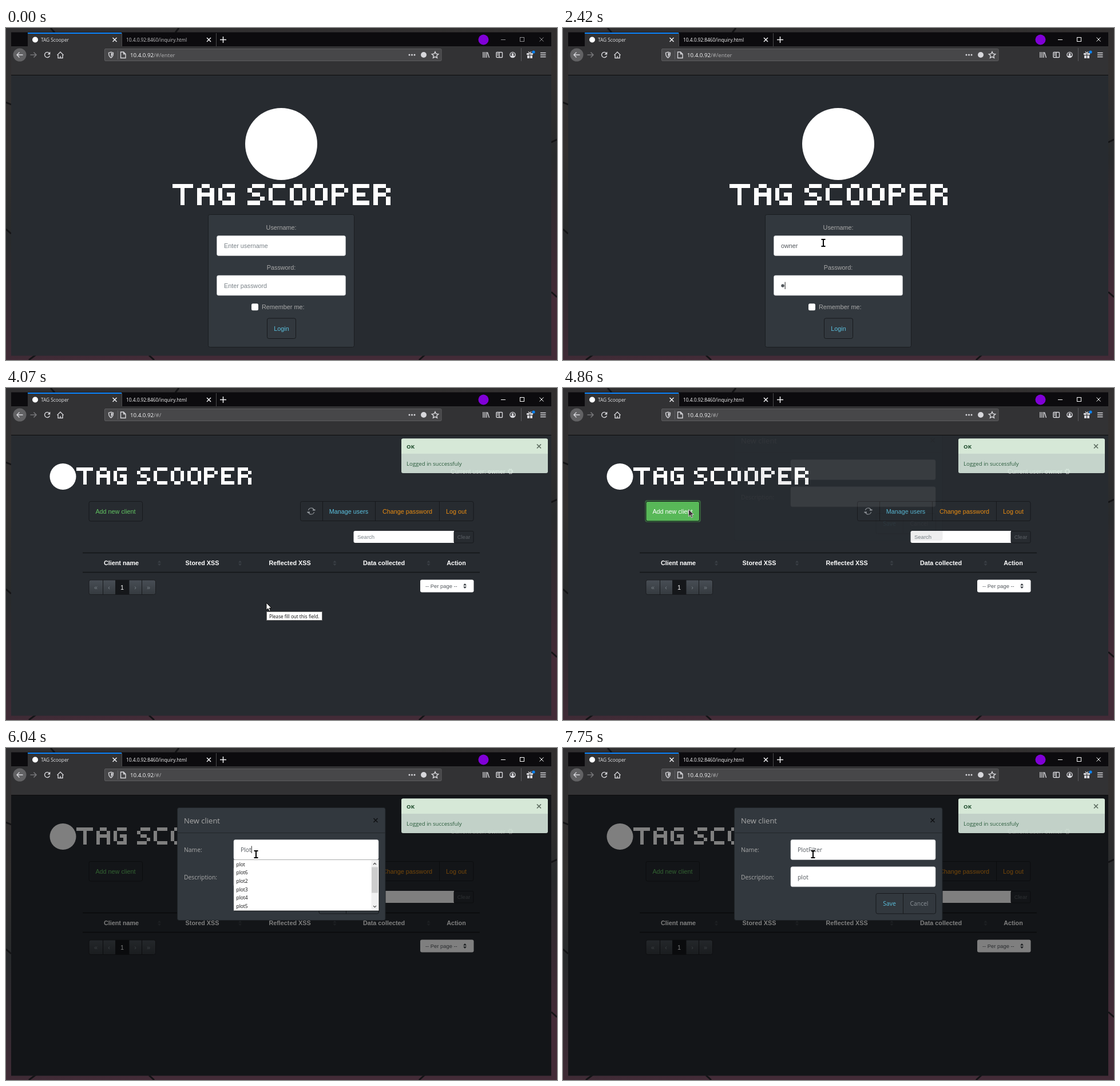
These frames come from a looping animation (963 px wide and 581 px high, 8000 ms). An HTML page:

```html
<!DOCTYPE html>
<html lang="en">
<head>
<meta charset="utf-8">
<title>TAG Scooper</title>
<style>
  html, body { margin: 0; width: 100%; height: 100%; overflow: hidden; background: #272b30; }
  svg { display: block; width: 100%; height: 100%; }
  text { white-space: pre; }
  .a { font: 10.8px "Liberation Sans", Arial, sans-serif; }
  .u { font: 10.35px "Open Sans", "Noto Sans", sans-serif; }
  .tab { font-size: 8.3px; }
  .url { font-size: 9.7px; }
  .sm { font-size: 9.5px; }
  .b { font-weight: bold; }
  .mid { text-anchor: middle; }
  .label { fill: #aaa; }
  .hint { fill: #7a8288; }
  .typed { fill: #52575c; }
  .info { fill: #5bc0de; }
  .warn { fill: #e88c12; }
  .white { fill: #fff; }
  .field { fill: #fff; stroke: #c9cdd1; stroke-width: .6; }
  .btn { fill: none; stroke: #17191c; }
  .line { fill: none; stroke: #d7d7db; stroke-width: 1.4; }
  .solid { fill: #d7d7db; }
  .list { font: 8.4px "Open Sans", "Noto Sans", sans-serif; fill: #0c0c0d; }
</style>
</head>
<body>
<svg id="stage" viewBox="0 0 963 581">
  <defs>
    <linearGradient id="wall" x2="0.25" y2="1">
      <stop offset="0" stop-color="#302f31"/>
      <stop offset=".35" stop-color="#33302f"/>
      <stop offset=".6" stop-color="#282a2c"/>
      <stop offset="1" stop-color="#432b37"/>
    </linearGradient>
    <linearGradient id="page" x2="0" y2="1">
      <stop offset="0" stop-color="#484e55"/>
      <stop offset="1" stop-color="#353a3f"/>
    </linearGradient>
    <path id="word" shape-rendering="crispEdges"/>
    <path id="sort" d="M-3 -1L0 -4.5 3 -1zM-3 1L0 4.5 3 1z"/>
    <path id="cross" d="M-3.5 -3.5l7 7m0 -7l-7 7"/>
  </defs>

  <rect width="963" height="581" fill="url(#wall)"/>
  <path d="M0 352l9 8M953 462l10 9M40 581l12-9M250 573l9 8M722 581l10-9M78 0l7 8M296 8l6-8M953 200l10-5M0 130l9 4" stroke="#141416" stroke-width="3"/>
  <rect x="9" y="82" width="944" height="491.5" fill="#272b30"/>

  <g id="login">
    <circle cx="481" cy="203" r="63" fill="#fff"/>
    <use href="#word" transform="translate(290.5 273) scale(7.33)" fill="#fff"/>
    <rect x="353.5" y="326.5" width="255" height="232" rx="3" fill="#32383e" stroke="#1a1d20"/>
    <text class="a label mid" x="481" y="353">Username:</text>
    <rect class="field" x="368.5" y="363.5" width="225" height="35" rx="3"/>
    <text class="a" id="userText" x="381" y="385"></text>
    <text class="a label mid" x="481" y="422.5">Password:</text>
    <rect class="field" x="368.5" y="433" width="225" height="35" rx="3"/>
    <text class="a hint" id="passHint" x="381" y="454.5">Enter password</text>
    <g id="dots" fill="#52575c"></g>
    <rect x="429" y="482.3" width="12" height="12" rx="2.5" fill="#fff"/>
    <text class="a label" x="447" y="492">Remember me:</text>
    <rect class="btn" x="456.5" y="508" width="50" height="35.5" rx="3"/>
    <text class="a info mid" x="481.5" y="530">Login</text>
  </g>

  <g id="main">
    <circle cx="99.5" cy="155" r="23" fill="#fff"/>
    <use href="#word" transform="translate(123 139.3) scale(5.88)" fill="#fff"/>
    <text class="a label" x="777" y="150" style="font-size:10.6px">Current user: <tspan class="b">owner</tspan></text>
    <circle cx="881.5" cy="146" r="3.6" fill="none" stroke="#aaa" stroke-width="2.4" stroke-dasharray="1.9 .93"/>
    <circle cx="881.5" cy="146" r="2.8" fill="none" stroke="#aaa"/>
    <rect id="addRing" x="143.2" y="196.2" width="97.6" height="38.6" rx="4" fill="#39653f"/>
    <rect class="btn" id="addBox" x="145" y="198.5" width="93.5" height="34.5" rx="3"/>
    <text class="a mid" id="addText" x="191.5" y="219.5">Add new client</text>
    <rect class="btn" x="514.5" y="198.5" width="302.5" height="34" rx="3"/>
    <path class="btn" d="M553.5 198.5v34M645.5 198.5v34M757.5 198.5v34"/>
    <g fill="none" stroke="#9a9fa4" stroke-width="1.1">
      <path d="M528.5 214a5.2 5.2 0 0 1 9.8-1M538.5 217a5.2 5.2 0 0 1-9.8 1"/>
      <path d="M536 213.5h4.5M531 217.5h-4.5" stroke-width="2"/>
    </g>
    <text class="a info mid" x="599" y="219.5">Manage users</text>
    <text class="a warn mid" x="701.5" y="219.5">Change password</text>
    <text class="a warn mid" x="787" y="219.5">Log out</text>
    <path d="M783 250h-172.500a3 3 0 0 0-3 3v15a3 3 0 0 0 3 3H783z" fill="#fff"/>
    <rect class="btn" x="783" y="250.5" width="34" height="20.5" rx="2"/>
    <text class="a sm hint" x="614" y="264">Search</text>
    <text class="a sm mid" x="800" y="264" fill="#5b6065">Clear</text>
    <path d="M134 288.500H828M134 322.500H828" stroke="#131517" stroke-width="1.3"/>
    <g class="a b mid white">
      <text x="201.500" y="310">Client name</text>
      <text x="343" y="310">Stored XSS</text>
      <text x="496" y="310">Reflected XSS</text>
      <text x="660.500" y="310">Data collected</text>
      <text x="787" y="310">Action</text>
    </g>
    <g fill="#3b4046">
      <use href="#sort" x="268" y="306.500"/><use href="#sort" x="409" y="306.500"/>
      <use href="#sort" x="574.500" y="306.500"/><use href="#sort" x="738.500" y="306.500"/>
    </g>
    <rect x="145" y="336" width="116.500" height="25.500" rx="3" fill="url(#page)" stroke="#1b1d20"/>
    <rect x="191" y="336" width="24.500" height="25.500" fill="#15171a"/>
    <path class="btn" d="M169.500 336v25.500M237.500 336v25.500"/>
    <g class="a mid hint">
      <text x="157" y="352.500">«</text><text x="180" y="352.500">‹</text>
      <text class="white" x="203" y="353">1</text>
      <text x="226" y="352.500">›</text><text x="249" y="352.500">»</text>
    </g>
    <rect x="724" y="335.500" width="93.500" height="22" rx="3" fill="#fff"/>
    <text class="a typed" x="733" y="350" style="font-size:9.4px">-- Per page --</text>
    <use href="#sort" x="802" y="346.500" fill="#33383d"/>
  </g>

  <rect id="backdrop" x="9" y="83" width="944" height="490.500"/>

  <g id="modal">
    <rect x="299.500" y="104.500" width="363.500" height="197" rx="3" fill="#32383e" stroke="#1f2327"/>
    <path d="M300 148.500H663" stroke="#23272b"/>
    <text class="u label" x="311" y="131.500" style="font-size:13px">New client</text>
    <use href="#cross" x="646" y="126.500" stroke="#101214" stroke-width="1.6"/>
    <text class="u label" x="311" y="182">Name:</text>
    <text class="u label" x="311" y="229.500">Description:</text>
    <rect class="field" x="398" y="160.500" width="253" height="35" rx="3"/>
    <rect class="field" x="398" y="207.800" width="253" height="35" rx="3"/>
    <text class="u typed" id="nameText" x="410" y="182"></text>
    <text class="u typed" id="descText" x="410" y="229.500"></text>
    <rect class="btn" x="547" y="254.500" width="104.500" height="35.500" rx="3"/>
    <path class="btn" d="M594.500 254.500v35.500"/>
    <text class="u info mid" x="570.500" y="276">Save</text>
    <text class="u mid" x="622.500" y="276" fill="#8a9197">Cancel</text>
  </g>

  <g id="toast">
    <rect x="691" y="88.500" width="256" height="60.500" rx="3" fill="#e1f3e7" fill-opacity=".85"/>
    <path d="M691 115V91.500a3 3 0 0 1 3-3H944a3 3 0 0 1 3 3V115z" fill="#dbeedb" fill-opacity=".8"/>
    <text class="u b" x="700" y="106" fill="#1c4a2a" style="font-size:9.600px">OK</text>
    <use href="#cross" x="931.500" y="102" stroke="#5c6b5f" stroke-width="1.700"/>
    <text class="u" x="700" y="136" fill="#2a5c3c" style="font-size:9.650px">Logged in successfuly</text>
  </g>

  <g id="chrome">
    <rect x="9" y="7.500" width="944" height="25" fill="#0c0b0e"/>
    <rect x="9" y="32" width="944" height="50" fill="#323234"/>
    <path d="M9 82.500H953" stroke="#0c0c0d"/>
    <rect x="38" y="8" width="164" height="25" fill="#323234"/>
    <rect x="38" y="8" width="164" height="2" fill="#0a84ff"/>
    <path d="M202.500 9v23M367.500 9v23" stroke="#4a4a4c"/>
    <circle cx="51" cy="20.500" r="5" fill="#fff"/>
    <text class="u tab" x="61" y="23.800" fill="#e4e4e6">TAG Scooper</text>
    <text class="u tab" id="tabText" x="210" y="23.800">10.4.0.92:8460/inquiry.html</text>
    <g stroke="#f0f0f2" stroke-width="1.500">
      <use href="#cross" x="190" y="20.500"/><use href="#cross" x="354.500" y="20.500"/>
      <path d="M374 20.500h11m-5.500-5.500v11"/>
    </g>
    <circle cx="834.500" cy="20.500" r="9" fill="#8000d7"/>
    <g id="winKeys" fill="none">
      <path d="M865 20.500h8"/><rect x="898.500" y="16.500" width="7" height="7"/>
      <use href="#cross" x="936" y="20"/>
    </g>
    <circle cx="24" cy="47" r="11.500" fill="#626264"/>
    <path class="line" d="M29.500 47H19m4.500-4.500L19 47l4.500 4.500" stroke-width="1.700"/>
    <path d="M42.500 47H53m-4.500-4.500L53 47l-4.500 4.500" fill="none" stroke="#77777a" stroke-width="1.500"/>
    <path class="line" d="M75.500 43.800a4.600 4.600 0 1 0 1 4.700"/>
    <path class="solid" d="M77.300 41.500v5h-5z"/>
    <path class="line" d="M89.500 47.500l5.500-5.500 5.500 5.500M91 47v5.500h8V47M95 52.500v-3.500"/>
    <rect x="172.500" y="36.500" width="588.500" height="21" rx="1.500" fill="#474749" stroke="#5c5c5f"/>
    <path class="line" d="M183.500 42.200l4 1.200c0 4-1 7-4 8.800-3-1.800-4-4.800-4-8.800z" stroke-width="1.100"/>
    <path class="solid" d="M183.500 43.500v7c1.800-1.500 2.600-3.500 2.700-6.200z"/>
    <path d="M195.500 39v16" stroke="#626265"/>
    <path class="line" d="M200.500 42h5l3.500 3.500V52.500h-8.500zM205.500 42v3.500h3.500" stroke-width="1.100"/>
    <text class="u url" x="217" y="51" fill="#f9f9fa">10.4.0.92<tspan id="path" fill="#b1b1b3"></tspan></text>
    <g class="solid">
      <circle cx="705" cy="47" r="1.500"/><circle cx="709.500" cy="47" r="1.500"/><circle cx="714" cy="47" r="1.500"/>
      <circle cx="730" cy="47" r="5"/>
    </g>
    <path class="line" d="M750 41.500l1.700 3.700 4 .5-3 2.700.8 4-3.500-2-3.500 2 .8-4-3-2.700 4-.5z" stroke-width="1.100"/>
    <path class="line" d="M834 42v10M837 42v10M840 42v10M841.500 42.500l3 9.500"/>
    <rect class="line" x="857" y="42.500" width="10.500" height="9" rx="1"/>
    <path class="line" d="M862 42.500v9M858.500 45h2M858.500 47.500h2"/>
    <circle class="line" cx="885.500" cy="47" r="4.600"/>
    <path class="solid" d="M881.500 49.500c2-2 6-2 8 0l-2 2.200h-4z"/><circle class="solid" cx="885.500" cy="46" r="2"/>
    <path d="M900.500 35v23" stroke="#5a5a5d"/>
    <path class="solid" d="M910 44h5v3h-5zM916 44h5v3h-5zM911 48h4v5h-4zM916 48h4v5h-4z"/>
    <path class="line" d="M915.500 44l-2.500-2.500M915.500 44l2.500-2.500"/>
    <circle cx="922" cy="42" r="2.600" fill="#0a84ff"/>
    <path class="line" d="M934 43.500h9.500M934 47h9.500M934 50.500h9.500"/>
  </g>

  <g id="menu" class="list"></g>
  <rect id="caret" width="1" height="12.500" fill="#222"/>
  <g id="tip">
    <rect x="455.500" y="391.500" width="97" height="15" fill="#fff" stroke="#6a6a6a"/>
    <text class="list" x="460" y="402.500" style="font-size:8.200px">Please fill out this field.</text>
  </g>
  <path id="arrow" d="M0 0V12.500L3 9.800 5.100 14.500 7.200 13.500 5.200 9H9z" stroke-width=".9"/>
  <path id="beam" d="M-3.500 -6H3.500M-3.500 6H3.500M0 -6V6" stroke="#000" stroke-width="2"/>
</svg>

<script>
const LOOP = 8000, TICK = 78.25;
const $ = id => document.getElementById(id);
const show = (id, on) => { $(id).style.display = on ? '' : 'none'; };
const set = (id, attrs) => { for (const a in attrs) $(id).setAttribute(a, attrs[a]); };
const clamp = v => Math.max(0, Math.min(1, v));
const easeOut = p => 1 - (1 - p) ** 2;
const smooth = p => p * p * (3 - 2 * p);

// Pixel lettering
const GLYPHS = {
  T: '##### ..#.. ..#.. ..#.. ..#..', A: '.##. #..# #### #..# #..#',
  G: '.### #... #.## #..# .###', S: '.### #... .##. ...# ###.',
  C: '.### #... #... #... .###', O: '.##. #..# #..# #..# .##.',
  P: '###. #..# ###. #... #...', E: '#### #... ###. #... ####',
  R: '###. #..# ###. #..# #..#'
};
function lettering(word) {
  let d = '', x = 0;
  for (const ch of word) {
    if (ch === ' ') { x += 2; continue; }
    const rows = GLYPHS[ch].split(' ');
    rows.forEach((row, y) => {
      for (const m of row.matchAll(/#+/g)) d += `M${x + m.index} ${y}h${m[0].length}v1h-${m[0].length}z`;
    });
    x += rows[0].length + 1;
  }
  return d;
}
set('word', { d: lettering('TAG SCOOPER') });

// Autocomplete popup
function popup(x, y, w, items, scroll) {
  const h = items.length * 14.6 + 1.5;
  const rows = items.map((s, i) => `<text x="${x + 4.5}" y="${y + 11.3 + i * 14.6}">${s}</text>`).join('');
  const bar = scroll ? `<rect x="${x + w - 13}" y="${y + 1}" width="12" height="${h - 2}" fill="#f0f0f0"/>
    <rect x="${x + w - 12.5}" y="${y + 13}" width="11" height="45" fill="#cdcdcd"/>
    <path d="M${x + w - 9.5} ${y + 8.5}l2.500-2.500 2.500 2.500m-5 ${h - 17}l2.500 2.500 2.500-2.500" fill="none" stroke="#505050" stroke-width="1.300"/>` : '';
  return `<rect x="${x + 1}" y="${y + 1.5}" width="${w + .5}" height="${h}" fill="#000" opacity=".4"/>
    <rect x="${x}" y="${y}" width="${w}" height="${h}" fill="#fff" stroke="#8a8a8a" stroke-width=".6"/>${rows}${bar}`;
}

const USER = 'owner', CLIENT = 'PlotFilter', NOTE = 'plot';
const USERS = ['owner', 'fox', 'oak', 'plot', 'ton'];
const CLIENTS = ['plot', 'plot6', 'plot2', 'plot3', 'plot4', 'plot5'];
const NOTES = ['plot', 'plan', 'page', 'pool'];
const match = (items, s) => {
  const hits = items.filter(i => i.includes(s.toLowerCase()));
  return hits.length === 1 && hits[0] === s ? [] : hits;
};

// Pointer legs: start tick, end tick, from, to, easing
const LEGS = [
  [1, 7, [788, 545], [455, 376], easeOut],
  [55, 60, [455, 376], [219.5, 212.5], smooth],
  [62, 66, [219.5, 212.5], [413, 143.500], smooth],
  [66, 71, [413, 143.500], [437, 186], smooth]
];
function pointer(k) {
  const [a, b, from, to, ease] = LEGS.filter(l => k >= l[0]).pop() || LEGS[0];
  const p = ease(clamp((k - a) / (b - a)));
  return from.map((v, i) => v + (to[i] - v) * p);
}

function caretAt(id, y) {
  const el = $(id);
  set('caret', { x: +el.getAttribute('x') + (el.textContent ? el.getComputedTextLength() : 0), y });
}

function render(k) {
  const during = (a, b) => k >= a && k < b;
  const onMain = k >= 50, active = k >= 9;

  // Window
  $('path').textContent = k < 48 ? '/#/enter' : '/#/';
  set('tabText', { fill: active ? '#f9f9fa' : '#c4c4c6' });
  set('winKeys', { stroke: active ? '#fff' : '#8c8c8e' });

  // Login form
  show('login', !onMain);
  const user = USER.slice(0, Math.max(0, k - 18));
  $('userText').textContent = user || 'Enter username';
  set('userText', { class: user ? 'a typed' : 'a hint' });
  const dots = k < 31 ? 0 : k < 33 ? 1 : k < 41 ? Math.min(6, k - 31) : Math.min(8, k - 34);
  show('passHint', !dots);
  $('dots').innerHTML = Array.from({ length: dots }, (_, i) =>
    `<circle cx="${384 + i * 6.65}" cy="451" r="2.750"/>`).join('');

  // Client page
  show('main', onMain);
  const hover = during(60, 63);
  show('addRing', during(61, 63));
  $('addBox').style.fill = hover ? '#58b858' : 'none';
  set('addText', { fill: hover ? '#fff' : '#62c462' });
  set('toast', { opacity: clamp((k - 49.5) / 2) });

  // Dialog
  show('modal', k >= 62);
  const fade = clamp(.08 + (k - 62) * .52);
  set('modal', { opacity: fade, transform: `translate(0 ${-35 * (1 - easeOut(clamp((k - 62) / 4)))})` });
  set('backdrop', { opacity: k < 63 ? 0 : fade * .5 });
  const name = CLIENT.slice(0, Math.max(0, k < 83 ? Math.min(4, k - 73) : k - 78));
  const note = NOTE.slice(0, Math.max(0, k - 93));
  $('nameText').textContent = name;
  $('descText').textContent = note;

  // Suggestions
  let args = null;
  if (during(18, 50)) args = [368.500, 399, 225, match(USERS, user)];
  if (during(73, 92)) args = [398, 195.500, 253.500, match(CLIENTS, name), true];
  if (k >= 94) args = [398, 243, 253.500, match(NOTES, note)];
  $('menu').innerHTML = args && args[3].length ? popup(...args) : '';

  // Caret
  show('caret', during(9, 13) || during(19, 25) || during(28, 38) || during(71, 90) || during(92, 99));
  if (k < 28) set('caret', { x: 381 + (user ? $('userText').getComputedTextLength() : 0), y: 375 });
  else if (k < 50) set('caret', { x: 381 + dots * 6.65, y: 444.500 });
  else if (k < 92) caretAt('nameText', 171.500);
  else caretAt('descText', 219);

  // Pointer
  show('tip', during(48, 56));
  const [x, y] = pointer(k);
  const inField = onMain ? k >= 68 && y > 160 : x < 594 && y < 399;
  show('arrow', k > 0 && !inField);
  show('beam', k > 0 && inField);
  set('arrow', {
    transform: `translate(${x} ${y})`,
    fill: hover ? '#40343a' : '#fff',
    stroke: hover ? '#d9d2d6' : '#000'
  });
  set('beam', { transform: `translate(${x} ${y})` });
}

let last = -1;
const start = performance.now();
function frame() {
  const t = (performance.now() - start) % LOOP;
  const k = Math.floor((t + 10) / TICK);
  if (k !== last) render(last = k);
  requestAnimationFrame(frame);
}
frame();
</script>
</body>
</html>
```
